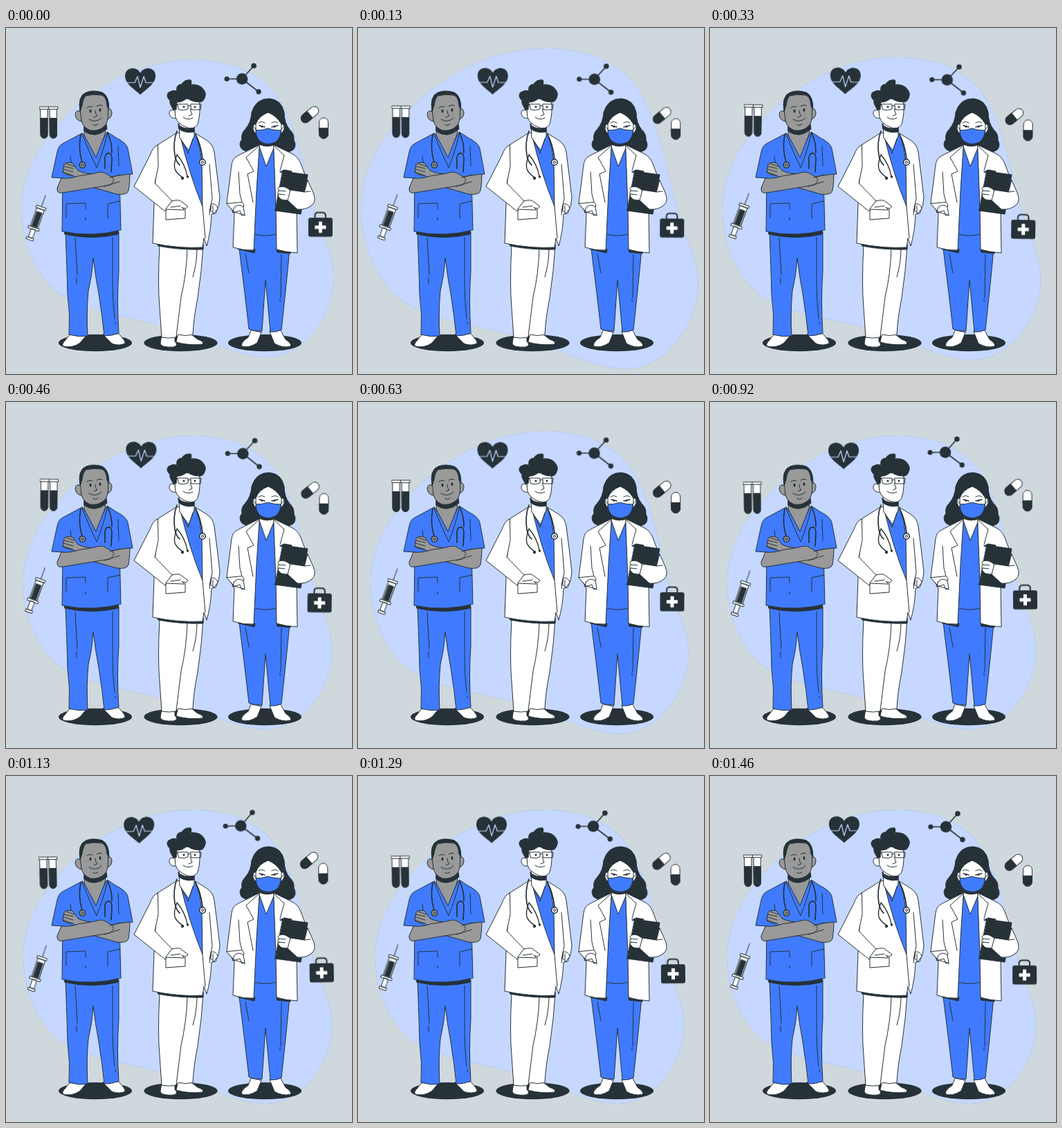
Write an HTML page without scripts that moves like this. It is 500 by 500 pixels and loops after 1500 ms.

```html
<!DOCTYPE html>
<html lang="en">
<head>
<meta charset="utf-8">
<title>Medical team</title>
<style>
  html, body { margin: 0; width: 100%; height: 100%; overflow: hidden; background: #cfd8dd; }
  svg { display: block; width: 100vw; height: 100vh; }
  .art { stroke: #263238; stroke-width: 1; stroke-linejoin: round; stroke-linecap: round; fill: none; }
  .w { fill: #fff; }
  .b { fill: #407bff; }
  .g { fill: #999; }
  .d { fill: #263238; }
  .tube { stroke-width: 1.7; }
  .n { stroke: none; }
  .blob { transform-origin: 248px 261px; animation: beat 1.5s linear -18ms infinite; }
  .icons { transform-origin: 251px 180px; animation: sway 1.5s linear -18ms infinite; }
  @keyframes beat {
    0%, 30%, 40%, 60%, 100% { transform: scale(1); }
    10%, 50% { transform: scale(1.092); }
  }
  @keyframes sway {
    0%, 100% { transform: rotate(0deg); }
    25% { transform: rotate(1deg); }
    75% { transform: rotate(-1deg); }
  }
</style>
</head>
<body>
<svg viewBox="0 0 500 500">
  <g class="blob">
    <path id="shape" fill="#407bff" d="M25 262C25 225 40 185 70 150C115 97 185 49 270 49C332 49 376 72 398 114C422 160 432 220 446 272C455 304 471 328 471 359C471 414 428 473 375 473C328 473 275 438 205 423C150 410 108 405 76 380C42 352 25 305 25 262Z"/>
    <use href="#shape" style="fill:#fff" opacity="0"/>
    <path fill="#fff" fill-opacity=".7" d="M25 262C25 225 40 185 70 150C115 97 185 49 270 49C332 49 376 72 398 114C422 160 432 220 446 272C455 304 471 328 471 359C471 414 428 473 375 473C328 473 275 438 205 423C150 410 108 405 76 380C42 352 25 305 25 262Z"/>
  </g>

  <g class="art icons">
    <g id="heart">
      <path class="d n" d="M194 96.500C184 87 172 81 172 69C172 57 188 54 194 65C200 54 216 57 216 69C216 81 204 87 194 96.500Z"/>
      <path stroke="#c6d7ff" stroke-width="1.200" d="M172.500 79H186L190 70L194 86L199 70L202 79H215.500"/>
    </g>
    <g id="molecule">
      <path stroke-width="1.600" d="M319 73.500H341L358 54.500M341 73.500L365 92"/>
      <g class="d n">
        <circle cx="341" cy="73.500" r="8.300"/><circle cx="358" cy="54.500" r="3.800"/>
        <circle cx="319" cy="73.500" r="3.600"/><circle cx="365" cy="92" r="3.700"/>
      </g>
    </g>
    <g id="tube">
      <path class="w" d="M50 117H60V154.500A5 5 0 0 1 50 154.500Z"/>
      <path class="d" d="M50 130.500H60V154.500A5 5 0 0 1 50 154.500Z"/>
      <path class="w" d="M48.500 114H61.500V117.500H48.500Z"/>
    </g>
    <use href="#tube" x="13.300"/>
    <g id="pill">
      <rect class="w" x="452.500" y="129.500" width="13" height="30" rx="6.500"/>
      <path class="d" d="M452.500 144.500H465.500V153A6.500 6.500 0 0 1 452.500 153Z"/>
    </g>
    <use href="#pill" transform="translate(439 125) rotate(50) scale(.98) translate(-459 -144.500)"/>
    <g id="kit">
      <rect class="d n" x="437" y="274" width="35" height="27.500" rx="3"/>
      <path stroke-width="2" d="M446.500 275V271Q446.500 266.500 451 266.500H457.500Q462 266.500 462 271V275"/>
      <path stroke="#fff" stroke-width="5" stroke-linecap="butt" d="M446.500 287.700H462.500M454.500 279.700V295.700"/>
    </g>
    <g id="syringe" transform="translate(45.500 275) rotate(19.500)">
      <path d="M0-35V-17"/>
      <path class="w" d="M-5.500-14H5.500V14H-5.500ZM-7-17.500H7V-14H-7ZM-3 17H3V30H-3ZM-5 30H5V33.500H-5ZM-8 14H8V17.500H-8Z"/>
      <path class="d" d="M-3.800-9H3.800V13H-3.800Z"/>
    </g>
  </g>

  <g class="d">
    <ellipse cx="129" cy="455" rx="53" ry="12.200"/>
    <ellipse cx="252.500" cy="455" rx="53" ry="12.200"/>
    <ellipse cx="374" cy="455" rx="53" ry="12.200"/>
  </g>

  <g id="nurse" class="art">
    <path class="w" d="M93 442L85 452Q80 457 83 460Q96 463 107 455L117 443ZM140 443L153 456Q163 460 172 456Q173 452 163 442Z"/>
    <path class="b" d="M86 295Q88 345 89 385Q93 415 91 443Q104 447 118 445Q116 410 119 380Q125 355 126 332Q129 358 134 384Q139 415 142 445Q153 445 163 441Q160 395 163 352V295Z"/>
    <path d="M100 303L103 357M102 361V370M154 303V360Q154 395 157 420M158 425V428"/>
    <path class="d" d="M85 293H162V298Q124 307 85 298Z"/>
    <path class="b" d="M110 152L82 167Q76 170 74 179L66 216L82 217L81 294Q124 303 166 292L164 214L183 211L176 174Q174 166 160 159L146 150L130 180Z"/>
    <path class="g" d="M114 138L113 155L130 187L143 154L145 136Z"/>
    <path class="d" d="M113 142Q127 154 145 139L146 146Q128 161 113 149Z"/>
    <path d="M110 153Q120 180 131 202Q140 180 147 151M93 185L96 210M162 170L163 200M87 274V254L115 253V262M115 274V278M147 275V254L165 250"/>
    <path class="g" d="M108 121Q101 117 100 125Q101 134 109 135ZM147 118Q153 115 153 123Q152 131 147 132Z"/>
    <path class="g" d="M107 116Q107 95 126 94Q146 94 147 112Q149 133 144 140Q135 150 122 148Q111 144 109 134Z"/>
    <path class="d" d="M107 121Q103 98 116 93Q126 89 139 93Q149 98 149 117L146 113Q145 99 139 97Q126 95 115 98Q111 103 110 112Z"/>
    <path d="M117 115Q121 112 125 114M131 113Q135 110 139 112M129 119Q129 125 132 127L127 129M120 132Q130 138 138 130M126 140Q130 142 133 139"/>
    <ellipse class="d n" cx="122" cy="120" rx="1.500" ry="2.500"/><ellipse class="d n" cx="136" cy="118.500" rx="1.500" ry="2.500"/>
    <path class="tube" d="M108 154Q104 175 110 194M147 152Q153 165 153 180M143 203V187Q144 180 150 181Q153 182 153 190L152 208"/>
    <circle class="g" cx="110.500" cy="198" r="4.200" stroke-width="1.500"/><circle cx="110.500" cy="198" r="1.500"/>
    <path class="g" d="M163 213L179 211Q179 225 177 235Q175 242 160 240L128 231L96 213Q83 212 82 208L84 197Q87 193 96 195L104 206L112 209L150 216Z"/>
    <path class="g" d="M80 217L74 231Q73 240 82 238L150 227Q160 220 152 215L142 209Q137 207 128 210L104 214Q94 218 80 217Z"/>
    <path d="M84 200L97 203M83 204L97 208M82 208L96 213M87 196L99 200M150 216L165 212M142 229L164 222"/>
  </g>

  <g id="doctor" class="art">
    <path class="w" d="M249 439L246 454Q263 459 284 457Q287 453 277 450L268 443ZM225 443L223 456Q224 462 242 461Q250 459 244 453L244 446Z"/>
    <path class="w" d="M222 314Q219 370 222 404L225 447Q236 449 245 447L249 443Q260 446 270 443Q271 420 277 390Q283 350 285 314Z"/>
    <path d="M262 318Q261 355 253 389L246 446M276 318Q276 340 270 360"/>
    <path class="d" d="M219 312H285V320Q250 321 220 315Z"/>
    <path class="w" d="M246 152L219 169L214 254L212 311Q250 319 284 317L286 304L290 315Q296 295 297 269L303 268Q309 256 309 245Q305 210 301 180Q299 168 291 163L272 151Z"/>
    <path class="b" d="M252 157L274 153Q281 172 283 193L284 258Q265 212 252 157Z"/>
    <path class="w" d="M250 138L251 159L264 177L272 156V138Z"/>
    <path class="d" d="M249 139Q256 148 272 144V150Q260 153 250 146Z"/>
    <path d="M284 258L288 304M253 161L263 181L270 160M294 197L298 246L294 265"/>
    <path class="w" d="M219 169Q212 172 208 184L185 229L230 265L240 250L215 224L220 200Z"/>
    <path class="w" d="M240 250Q250 247 254 251L263 258Q260 263 254 259L258 263L231 262Z"/>
    <path d="M231 263V277L259 275V262M238 259L252 257"/>
    <path class="w" d="M297 254Q304 253 306 261L300 268L296 264Z"/>
    <path d="M296 258L294 270M299 257V266"/>
    <path class="tube" d="M247 149Q241 165 244 184Q246 194 251 198M274 154Q282 170 284 189"/>
    <path stroke-width="1.400" d="M247 183Q241 199 245 206Q250 213 254 215M247 183Q259 197 262 214"/>
    <circle class="d n" cx="255" cy="217" r="2.200"/><circle class="d n" cx="262.500" cy="215" r="1.700"/>
    <circle class="w" cx="284" cy="194" r="4.300" stroke-width="1.500"/><circle cx="284" cy="194" r="1.600"/>
    <path class="w" d="M244 119Q235 116 236 125Q239 132 246 130Z"/>
    <path class="w" d="M243 103L279 102Q282 122 277 139Q272 147 262 144Q248 139 245 129Z"/>
    <path class="d" d="M239 113Q236 108 237 105Q230 98 235 93Q241 89 247 91Q245 82 254 81Q258 74 267 75Q269 78 267 82Q277 81 283 86Q291 94 287 101Q285 107 280 107Q268 107 262 101Q254 108 247 107L246 118L242 118Z"/>
    <path d="M245 111H248M248 110H263V117Q257 120 250 118ZM267 110H282L281 118H268ZM263 113Q265 111 267 113M266 117L269 125L264 127M256 129Q263 134 270 130"/>
    <circle class="d n" cx="257" cy="114" r="1.500"/><circle class="d n" cx="273" cy="114" r="1.500"/>
  </g>

  <g id="nurse-mask" class="art">
    <path class="w" d="M354 437L350 447Q338 455 341 460Q351 463 363 455L369 440ZM381 439L388 456Q400 463 411 460Q414 457 404 450L397 437Z"/>
    <path class="b" d="M336 310Q340 345 344 375L351 435Q360 439 370 438L375 364L382 439Q391 440 398 436L404 380L411 310L391 290H359Z"/>
    <path d="M346 326L351 354M398 327L397 390M396 392V396"/>
    <path class="d" d="M335 315L360 320L359 325L336 320ZM391 318L412 322L411 326L392 324Z"/>
    <path class="d" d="M380 102Q361 102 355 122Q354 137 346 146Q339 153 341 161Q335 168 341 175Q350 182 364 177H395Q409 182 416 175Q420 169 416 162Q417 153 410 147Q402 137 402 122Q398 103 380 102Z"/>
    <path class="b" d="M365 169H388L391 298Q375 302 359 298Z"/>
    <path class="w" d="M367 160L366 171L376 200L388 171L387 160Z"/>
    <path class="d" d="M366 162H390V168Q377 174 366 168Z"/>
    <path class="w" d="M366 169L336 184Q327 188 326 198L319 253L330 268L328 317Q344 322 358 321L362 235Z"/>
    <path class="w" d="M387 169L414 182Q422 186 426 196L438 228L420 262L421 325Q404 324 391 320L390 260Z"/>
    <path d="M366 170L347 187L358 207L349 211L357 252M336 208L338 240L343 259M387 170L402 184L396 206"/>
    <path class="w" d="M319 254Q324 260 330 266L344 257Q343 250 337 252Z"/>
    <path class="w" d="M330 259Q338 253 343 259L345 269L341 271L338 264L328 267Z"/>
    <path d="M327 265L346 271"/>
    <path class="d" d="M400 207L436 212L426 269L389 264Z"/>
    <path class="d" d="M396 208L402 205L413 207L411 212Z"/>
    <path class="w" d="M411 235Q403 227 395 230Q391 232 395 235Q391 237 394 240Q392 243 395 245Q396 249 408 249Z"/>
    <path class="w" d="M436 220L444 238Q449 250 442 256Q434 263 421 262L407 249L411 234L431 237Z"/>
    <path d="M395 235L404 236M394 240L403 241M431 237L440 236"/>
    <path class="w" d="M362 139Q356 138 357 146Q359 153 363 152ZM397 139Q403 138 402 146Q399 153 396 152Z"/>
    <path class="w" d="M379 122Q365 127 361 139Q360 165 379 168Q399 164 398 139Q391 127 379 122Z"/>
    <path d="M365 137Q369 134 374 137M384 137Q389 134 393 137M362 148L358 143M397 148L401 143"/>
    <path stroke-width="1.400" d="M366 141L374 143M384 143L393 141"/>
    <circle class="d n" cx="370" cy="142.500" r="1.400"/><circle class="d n" cx="388" cy="142.500" r="1.400"/>
    <path class="b" d="M361 148Q371 148 378 145Q387 148 397 148Q397 160 389 165Q379 170 369 165Q361 160 361 148Z"/>
  </g>
</svg>
</body>
</html>
```
